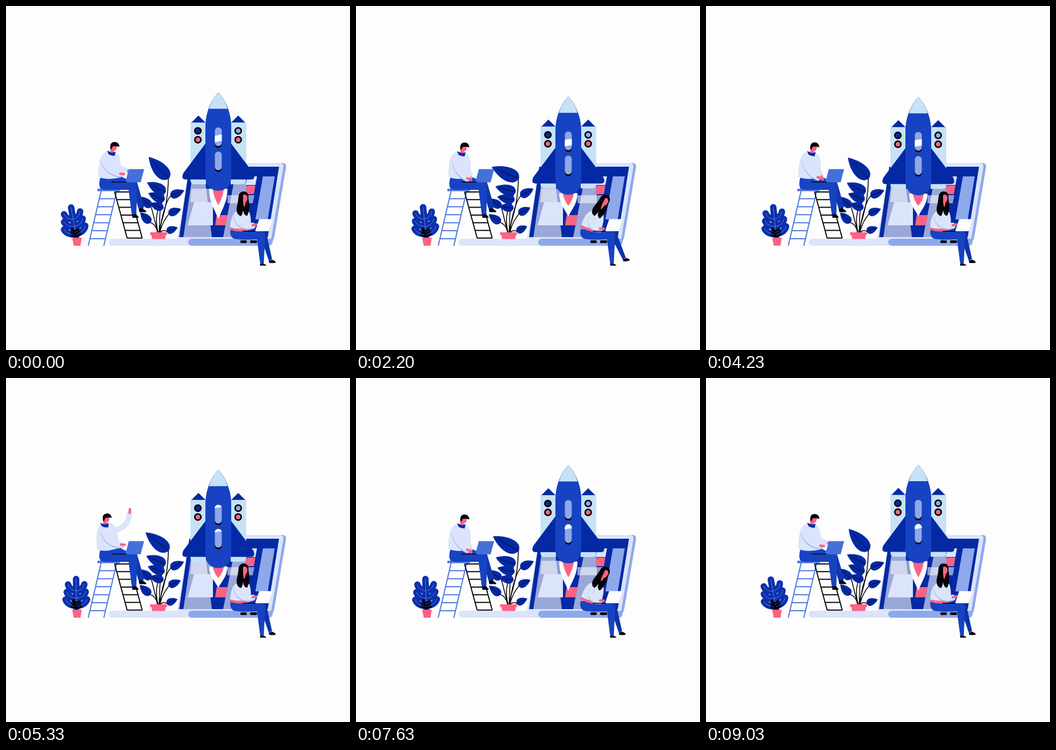
Write an HTML page that moves like this. It is 640 px wide and 640 px high and loops after 9.06 s.

```html
<!DOCTYPE html>
<html lang="en">
<head>
<meta charset="utf-8">
<title>Rocket launch</title>
<style>
  html, body { margin: 0; width: 100%; height: 100%; overflow: hidden; background: #fdfdfd; }
  svg { display: block; width: 100%; height: 100%; }
  .blue { fill: #1743c2; }
  .navy { fill: #0429a4; }
  .sky { fill: #8ea8ec; }
  .pale { fill: #c6e2f6; }
  .lilac { fill: #dce4fb; }
  .pink { fill: #fb6384; }
  .white { fill: #fdfdfd; }
  .ink { fill: #050507; }
  .line { fill: none; stroke: #050507; stroke-width: 1.6; stroke-linecap: round; }
  .limb { fill: none; stroke-linecap: round; stroke-linejoin: round; }
  .shade { stroke: #a3b8f0; stroke-width: 11; }
  .sleeve { stroke: #dce4fb; stroke-width: 10; }
  .hand { stroke: #fb6384; stroke-width: 4.5; }
</style>
</head>
<body>
<svg viewBox="0 0 640 640">
  <!-- laptop -->
  <path class="sky" d="M350 292H514Q522 292 521 300L499 430Q497 441 488 441H330Z"/>
  <path class="lilac" d="M343 292H509Q517 292 516 300L494 430Q492 438 484 438H317Z"/>
  <path class="navy" d="M341 299H508L487 430H322Z"/>
  <path class="lilac" d="M449 317H467L464 333H446Z"/>
  <path class="white" opacity=".6" d="M345 328H371L383 430H330ZM424 328H447L450 430H404Z"/>
  <path class="lilac" d="M350 365H385V408H338Z"/>
  <path class="white" opacity=".55" d="M345 340H385V365H343ZM412 352H462L459 367H412Z"/>
  <path class="blue" d="M385 350H411V365H385Z"/>
  <path class="pink" d="M392 389H412L409 408H389ZM448 334H464L461 350H445Z"/>
  <path class="sky" d="M478 317H500L487 397H464Z"/>
  <rect class="lilac" x="191" y="433" width="180" height="13" rx="6.5"/>
  <rect class="sky" x="339" y="433" width="157" height="13" rx="6.5"/>
  <rect class="ink" x="436" y="436" width="12" height="5" rx="2"/>
  <rect class="ink" x="454" y="436" width="13" height="5" rx="2"/>

  <!-- rocket, drawn at its highest point -->
  <g id="rocket">
    <g id="flame">
      <path class="white" d="M378 340C378 366 389 380 395 397C401 380 412 366 412 340Z"/>
      <path class="pink" d="M385 342Q386 355 395 371Q404 355 405 342Z"/>
    </g>
    <path class="pale" d="M343 216H372V332H350Q343 332 343 322ZM418 216H447V322Q447 332 440 332H418Z"/>
    <path class="navy" d="M345 217L358 204L371 217ZM419 217L432 204L445 217Z"/>
    <g stroke="#050507" stroke-width="2.8">
      <circle class="navy" cx="357" cy="232.5" r="5.7"/>
      <circle class="pink" cx="357" cy="249" r="5.7"/>
      <circle class="sky" cx="432" cy="232.5" r="5.7"/>
      <circle class="pink" cx="432" cy="249" r="5.7"/>
    </g>
    <path class="navy" d="M372 255L330 311Q325 323 334 323H456Q465 323 460 311L418 255Z"/>
    <path class="blue" d="M395 161C384 172 371 196 371 224V318C371 332 380 344 395 344S419 332 419 318V224C419 196 406 172 395 161Z"/>
    <path class="pale" d="M395 161Q384 172 377.500 191.500H412.500Q406 172 395 161Z"/>
    <clipPath id="panes">
      <rect x="388.5" y="226" width="13" height="35" rx="6.5"/>
      <rect x="388.5" y="271" width="13" height="35" rx="6.5"/>
    </clipPath>
    <rect class="ink" x="388.5" y="229" width="13" height="35" rx="6.5"/>
    <rect class="ink" x="388.5" y="274" width="13" height="35" rx="6.5"/>
    <g clip-path="url(#panes)">
      <path class="sky" d="M388 226H402V306H388Z"/>
      <path id="shine" class="white" d="M386 221L404 218V230L386 233ZM386 266L404 263V275L386 278Z"/>
    </g>
  </g>

  <!-- tall plant -->
  <g class="line">
    <path d="M284 422C290 395 302 370 302 318M285 422C286 390 286 360 296 346"/>
    <path d="M283 422C276 395 282 375 293 362M283 422C276 400 274 385 270 374"/>
    <path d="M286 422C290 385 300 360 306 354M286 422C290 405 296 396 303 387M282 422C280 410 274 404 268 403M287 422Q290 416 299 419"/>
  </g>
  <g id="leaves"></g>
  <path class="pink" d="M268 421H299.500V426H297.500L296 433.500H272L270.500 426H268Z"/>
  <path fill="#fde3e8" d="M276 445H292Q291 447 288 447H280Q277 447 276 445Z"/>

  <!-- ladder -->
  <path id="steps" fill="none" stroke="#4a76de" stroke-width="2"/>
  <path id="stepsBack" fill="none" stroke="#050507" stroke-width="2"/>
  <rect x="170" y="340" width="42" height="4.5" fill="#4a76de"/>

  <!-- small plant -->
  <g id="bush"></g>
  <path class="pink" d="M123 431H141L138.500 446H126Z"/>

  <!-- man -->
  <path class="limb" stroke="#0f36ac" stroke-width="11" d="M205 330L239 331L251 373"/>
  <path class="ink" d="M247 377L253 376Q258 379 261 382V383.500H248Z"/>
  <path class="blue" d="M176 317Q171 333 176 340Q180 342 190 342H228L234 388H242.500L244 332Q243 326 230 325L214 317Z"/>
  <path class="ink" d="M235 388L241 387Q245 390 246.500 392.500V394H235Z"/>
  <g id="farArm"></g>
  <g id="manBody">
    <path class="lilac" d="M187 271Q175 276 173 296Q171 310 172 318Q188 325 213 319Q214 305 213 290Q212 276 203 272Z"/>
    <g id="manHead">
      <path class="pink" d="M194 274V261Q200 257 206.500 261Q206 270 200.500 271L200 276Z"/>
      <path class="ink" d="M194 266Q193 254 202 254Q210 254 211 263Q203 261 199 262Q197 264 196 268Z"/>
      <path class="navy" d="M188 270L197 274L204 272L202 280L196 279L191 277Z"/>
    </g>
  </g>
  <g id="nearArm"></g>
  <path fill="#4570d8" d="M228.500 303.500H257L250.500 328H222Z"/>
  <path class="line" d="M197 327.500H224"/>

  <!-- woman -->
  <g id="kick">
    <path fill="#0b34ac" d="M470 419L483 417L495 471L489 474Z"/>
    <path class="ink" d="M489 474L495 472Q501 474 502 477Q500 479 490 478Z"/>
  </g>
  <path class="blue" d="M418 415Q415 428 424 433Q440 436 467 434L473 480H479.500L482 430Q483 418 470 417Z"/>
  <path class="ink" d="M473 479.500H479Q484 481 484.500 483H472.500Z"/>
  <g id="womanBody">
    <path class="lilac" d="M429 382Q418 388 417 413Q436 420 455 412Q457 396 453 384Q445 378 429 382Z"/>
    <path class="pink" d="M417 412Q436 417 456 412V416Q436 423 416 416Z"/>
    <g id="womanHead">
      <path class="ink" d="M433 352Q436 344 443 345Q452 346 451 358Q455 376 449 390Q443 391 441 380Q440 388 437 391Q428 388 429 376Q432 364 433 352Z"/>
      <path class="pink" d="M441 352Q445 348 449 354Q450 362 446 365L444 373Q442 376 441 364Z"/>
    </g>
  </g>
  <g id="girlArm"></g>
  <path class="white" d="M471 396.500H496L488.500 419H463.500Z"/>
  <path class="line" d="M441 419H464"/>
</svg>
<script>
const LOOP = 9060, CYCLE = LOOP / 2;
const $ = id => document.getElementById(id);
const wave = turns => .5 - .5 * Math.cos(2 * Math.PI * turns);
const ease = (a, b, x) => {
  const k = Math.min(1, Math.max(0, (x - a) / (b - a)));
  return k * k * (3 - 2 * k);
};
const mix = (a, b, k) => a.map((v, i) => v + (b[i] - v) * k);
const move = (id, value) => $(id).setAttribute('transform', value);
const draw = (id, d) => $(id).setAttribute('d', d);

const leaves = [{ x: 303, y: 321, size: 55, angle: 227, swing: -24 }];
for (let i = 0; i < 3; i++) {
  leaves.push({ x: 297 - 2 * i, y: 346 + 15 * i, size: 39 - 6 * i, angle: 207 - 4 * i, swing: -12 });
  leaves.push({ x: 306 - 3.5 * i, y: 354 + 33 * i, size: 28 - 3 * i, angle: i - 23, swing: -7 });
  if (i) leaves.push({ x: 271 - i, y: 345 + 29 * i, size: 27, angle: 225, swing: -10 });
}
$('leaves').innerHTML = leaves.map(({ size: s }) => {
  const w = 4 + s * .26;
  return `<g><path class="navy" d="M0 0C${.05 * s} ${-w} ${.55 * s} ${-w} ${s} 0C${.6 * s} ${w * .8} ${.05 * s} ${w} 0 0Z"/>
    <path class="line" style="stroke-width:.8" d="M0 0Q${.4 * s} -1.500 ${.8 * s} 0"/></g>`;
}).join('');
const leafNodes = [...$('leaves').children];

// lobed leaf with a dark fern in front
function lobes(rows, root, gap, reach, rise) {
  let d = '';
  for (let i = 0; i < rows; i++)
    for (const side of [-1, 1]) {
      const y = root - i * gap, x = reach * (1 - .12 * i);
      d += `M131 ${y}Q${131 + side * x * .8} ${y - 1} ${131 + side * x} ${y - rise}`;
    }
  return d;
}
const stroke = (color, width, d) =>
  `<path class="limb" stroke="${color}" stroke-width="${width}" d="${d}"/>`;
const blade = 'M131 428V374' + lobes(3, 424, 14, 20, 12);
$('bush').innerHTML = stroke('#0a30ac', 12, blade) + stroke('#6c8ce6', .8, blade)
  + stroke('#050507', 3.5, 'M131 431L126 412' + lobes(3, 428, 5, 9, 3));

// rails and evenly spaced rungs
function ladder(id, x1, x2, top, slope, bottom, first, gap) {
  const x = (base, y) => base + (y - top) * slope;
  let d = [x1, x2].map(b => `M${b} ${top}L${x(b, bottom)} ${bottom}`).join('');
  for (let y = first; y <= bottom; y += gap) d += `M${x(x1, y)} ${y}H${x(x2, y)}`;
  draw(id, d);
}
ladder('steps', 177, 206, 344, -.235, 446, 358.5, 14.9);
ladder('stepsBack', 202, 230, 346, .273, 432, 346, 14.3);

for (const id of ['farArm', 'nearArm', 'girlArm'])
  $(id).innerHTML = ['shade', 'sleeve', 'hand'].map(part => `<path class="limb ${part}"/>`).join('');
$('farArm').firstChild.remove();

// the elbow stands off the middle of shoulder and wrist by the bend
function arm(id, [sx, sy, wx, wy, bend]) {
  const dx = wx - sx, dy = wy - sy, k = bend / Math.hypot(dx, dy);
  const ex = sx + dx / 2 - dy * k, ey = sy + dy / 2 + dx * k;
  const f = 7 / Math.hypot(wx - ex, wy - ey);
  for (const path of $(id).children) {
    const low = path.matches('.shade') ? 1.5 : 0;
    path.setAttribute('d', path.matches('.hand')
      ? `M${wx} ${wy}l${(wx - ex) * f} ${(wy - ey) * f}`
      : `M${sx} ${sy + low}Q${ex} ${ey + low} ${wx} ${wy + low}`);
  }
}

function frame() {
  const t = performance.now() % LOOP, p = t % CYCLE;

  const drop = wave(t * 18 / LOOP - .04);
  move('rocket', `translate(0 ${drop * 10.3 - .4})`);
  move('flame', `translate(0 343) scale(1 ${1 - .31 * drop}) translate(0 -343)`);
  move('shine', `translate(0 ${-24 + 72 * Math.min(1, Math.max(0, (t - 4260) / 3210))})`);

  const sway = Math.sin(Math.PI * p / CYCLE) ** 1.5;
  leafNodes.forEach((node, i) => {
    const { x, y, angle, swing } = leaves[i];
    node.setAttribute('transform', `translate(${x} ${y}) rotate(${angle + swing * sway})`);
  });
  move('bush', `rotate(${-11 + 11 * wave(t * 11 / LOOP + .1)} 132 431)`);

  // he reaches out, waves and goes back to typing
  const reach = 1 - ease(950, 1230, p) * (1 - ease(4150, 4480, p));
  const up = ease(60, 480, p) * (1 - ease(880, 1180, p));
  const tap = (1 - reach) * Math.sin(t / 60) * .6;
  const far = mix([203, 284, 212, 318 + tap, 1], [201, 284, 227, 307, 11], reach);
  arm('farArm', mix(far, [196, 283, 230, 251, 21], up));
  arm('nearArm', mix([184, 288, 207, 320 - tap, 10], [181, 287, 214, 310, 13], Math.max(up, reach * .8)));
  move('manBody', `rotate(${-7 * up} 185 335)`);
  move('manHead', `translate(${-5 * up} ${-reach})`);

  // she leans over and kicks twice meanwhile
  const lean = ease(880, 1230, p) * (1 - ease(3750, 4250, p));
  move('womanBody', `rotate(${14 * lean} 437 418)`);
  move('womanHead', `translate(${4 * lean} ${lean}) rotate(${12 * lean} 442 366)`);
  arm('girlArm', mix([428, 391, 459, 408, 16], [438, 392, 454, 414, 17], lean));
  const swing = p > 960 && p < 3060 ? wave((p - 960) / 1050) : 0;
  move('kick', `rotate(${-28 * swing} 476 422)`);

  requestAnimationFrame(frame);
}
frame();
</script>
</body>
</html>
```
